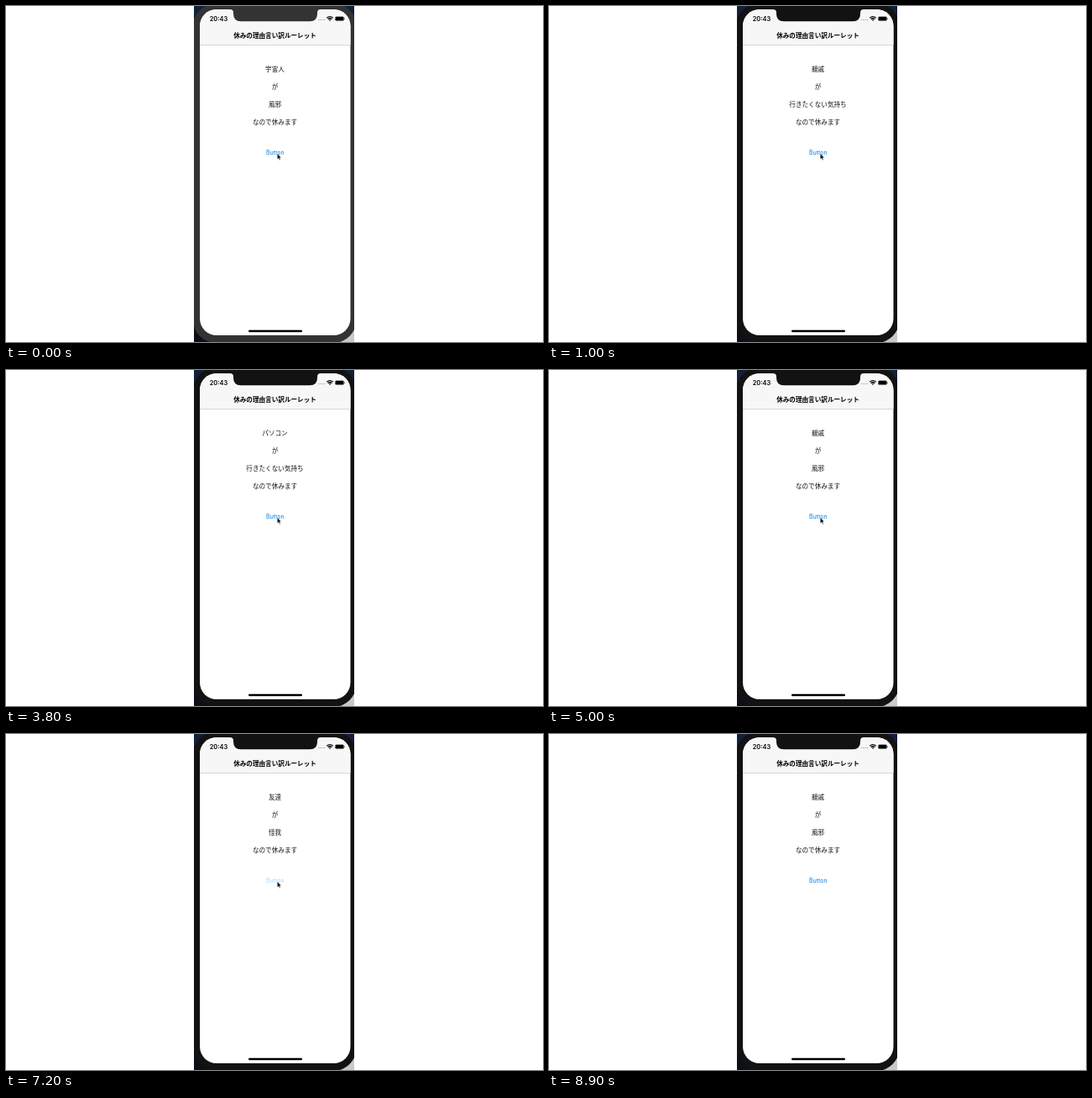
Write an HTML page that moves like this. It is 640x400 px and loops after 9 s.

```html
<!DOCTYPE html>
<html lang="ja">
<head>
<meta charset="utf-8">
<title>休みの理由言い訳ルーレット</title>
<style>
  html, body { margin: 0; width: 100%; height: 100%; overflow: hidden; background: #fff; }
  svg { display: block; width: 100vw; height: 100vh; }
  text { text-anchor: middle; fill: #111; }
  .ja { font: 400 7.6px "Noto Sans CJK JP", "Noto Sans CJK", sans-serif; }
  .title { font-weight: 700; fill: #000; }
  .ui { font: 400 7px Inter, sans-serif; }
</style>
</head>
<body>
<svg viewBox="0 0 640 400">
  <defs>
    <clipPath id="window"><rect x="224" y="0" width="191" height="400"/></clipPath>
    <clipPath id="screen"><rect x="231" y="4" width="179.5" height="388" rx="20"/></clipPath>
  </defs>
  <rect width="640" height="400" fill="#fff"/>
  <g clip-path="url(#window)">
    <rect x="224" width="191" height="400" fill="#0b0f18"/>
    <rect x="224" width="191" height="30" fill="#13203c"/>
    <rect x="380" y="360" width="35" height="40" fill="#c9c9c9"/>
    <rect id="bezel" x="223" y="-3" width="194.5" height="404" rx="27"/>

    <g clip-path="url(#screen)">
      <rect x="231" y="4" width="180" height="388" fill="#fff"/>
      <rect x="231" y="4" width="180" height="42.2" fill="#f7f7f7"/>
      <rect x="231" y="46" width="180" height=".6" fill="#bcbcbc"/>
    </g>
    <path id="notch" d="M267 3.5V4Q271 4 271 8V9.500Q271 18.300 280 18.300H362Q371 18.300 371 9.500V8Q371 4 375 4V3.500Z"/>

    <text class="ui" x="253.500" y="17.600" style="font-size:7.400px;font-weight:600;fill:#000">20:43</text>
    <g fill="#aaa">
      <circle cx="372.800" cy="16.500" r=".7"/><circle cx="375" cy="16.500" r=".7"/>
      <circle cx="377.200" cy="16.500" r=".7"/><circle cx="379.400" cy="16.500" r=".7"/>
    </g>
    <g fill="none" stroke="#000" stroke-width="1.300">
      <path d="M382.300 14.300Q386 11 389.700 14.300"/>
      <path d="M383.700 15.800Q386 13.800 388.300 15.800"/>
    </g>
    <path d="M384.800 16.700Q386 15.800 387.200 16.700L386 18Z"/>
    <rect x="392.400" y="12.700" width="10.200" height="4.900" rx="1.400" fill="#000" stroke="#777" stroke-width=".5"/>
    <rect x="403.100" y="14.300" width=".9" height="1.800" rx=".4" fill="#666"/>

    <text class="ja title" x="320.500" y="38.400">休みの理由言い訳ルーレット</text>
    <text class="ja" id="who" x="320.500" y="77.800"></text>
    <text class="ja" x="320.500" y="99">が</text>
    <text class="ja" id="why" x="320.500" y="120.200"></text>
    <text class="ja" x="320.500" y="141.400">なので休みます</text>
    <text class="ui" id="button" x="320.800" y="176.800" style="fill:#067de2">Button</text>
    <rect x="289" y="385.800" width="64" height="2.500" rx="1.250" fill="#000"/>

    <path id="cursor" d="M0 0V7.200L1.700 5.700L2.800 8.200L4 7.700L2.900 5.200H5.100Z"
      fill="#000" stroke="#fff" stroke-width=".6" stroke-linejoin="round"/>
  </g>
</svg>
<script>
const LOOP = 9000, STEP = 100, FADE = 400;
const $ = id => document.getElementById(id);
const clamp = v => Math.max(0, Math.min(1, v));
const smooth = v => v * v * (3 - 2 * v);

const COLD = '風邪', HURT = '怪我', LAZY = '行きたくない気持ち';
const start = { who: '宇宙人', why: COLD };
const taps = [
  { down: 100, up: 300, who: '親戚', why: LAZY },
  { down: 1800, up: 1800, who: '友達', why: COLD },
  { down: 3100, up: 3300, who: 'パソコン', why: LAZY },
  { down: 4200, up: 4200, who: '親戚', why: COLD },
  { down: 5000, up: 5100, who: 'パソコン', why: COLD },
  { down: 6100, up: 6100, who: 'パソコン', why: LAZY },
  { down: 7100, up: 7100, who: '友達', why: HURT },
  { down: 8100, up: 8200, who: '親戚', why: COLD }
];

function buttonAlpha(t) {
  const tap = taps.filter(p => t >= p.down && t > p.down - (p.down === p.up)).pop();
  if (!tap || (tap.down === tap.up && t === tap.up)) return 1;
  return 0.2 + 0.8 * smooth(clamp((t - tap.up) / FADE));
}

function draw(time) {
  const t = Math.floor((time % LOOP) / STEP) * STEP;
  const label = taps.filter(p => t > p.up).pop() || start;
  $('who').textContent = label.who;
  $('why').textContent = label.why;
  $('button').setAttribute('opacity', buttonAlpha(t));

  const shell = t < 100 ? '#333' : '#121212';
  $('bezel').setAttribute('fill', shell);
  $('notch').setAttribute('fill', shell);

  // the pointer leaves past the top left corner
  const out = smooth(clamp((t - 8500) / 400));
  $('cursor').setAttribute('transform', `translate(${323.2 - 115 * out} ${175.6 - 190 * out})`);
}

const begin = performance.now();
function tick() {
  draw(performance.now() - begin);
  requestAnimationFrame(tick);
}
draw(0);
requestAnimationFrame(tick);
</script>
</body>
</html>
```
